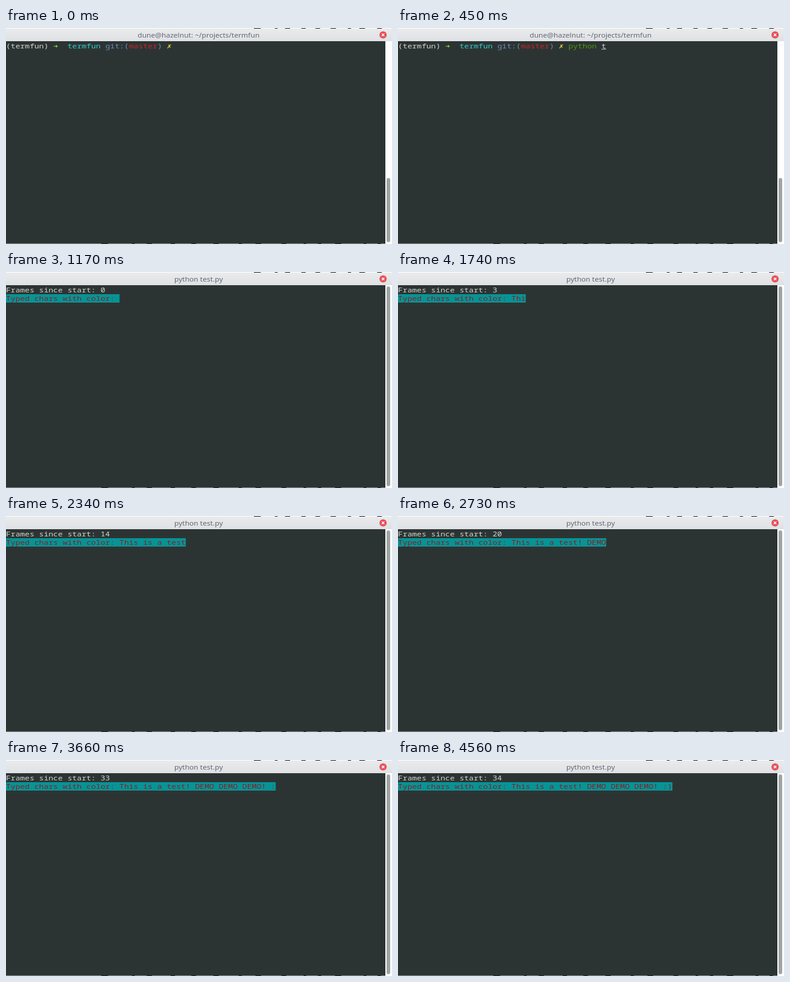
Recreate the animation shown at these times as an HTML page with a canvas. Size 640 px wide and 360 px high, loop 4.62 s.

```html
<!DOCTYPE html>
<html lang="en">
<head>
<meta charset="utf-8">
<title>Terminal typing</title>
<style>
  html, body { margin: 0; width: 100%; height: 100%; overflow: hidden; }
  canvas { display: block; }
</style>
</head>
<body>
<canvas id="stage" width="640" height="360"></canvas>
<script>
const ctx = document.getElementById('stage').getContext('2d');
const LOOP = 4620, COL = 7.845, ROW = 14, ASPECT = 0.87;
const MONO = '13.075px "Noto Sans Mono", "DejaVu Sans Mono", monospace';
const SANS = '12px "Noto Sans", sans-serif';
const LIGHT = '#d3d7cf', BLUE = '#688fba';
const LABEL = 'Typed chars with color: ';
const TITLE_TIME = 1110, LAUNCH_TIME = 1170, COMMAND_PACE = 53, MESSAGE_PACE = 39;

// Each burst of typing starts at its own time (ms)
const BURSTS = [[1640, 'This is a test'], [2370, '! '], [2610, 'DEMO DEMO DEMO'],
  [3270, '!'], [3540, ' :'], [3960, ')']];

function typed(text, start, pace, t) {
  return text.slice(0, Math.max(0, 1 + Math.floor((t - start) / pace)));
}

function rect(x, y, w, h, color) {
  ctx.fillStyle = color;
  ctx.fillRect(x, y, w, h);
}

// The whole screen is slightly flattened, so all lettering is too
function text(string, x, y, color, font, align) {
  ctx.save();
  ctx.translate(x, y);
  ctx.scale(1, ASPECT);
  ctx.font = font;
  ctx.textAlign = align;
  ctx.fillStyle = color;
  ctx.fillText(string, 0, 0);
  ctx.restore();
}

function write(string, col, row, color, weight = '') {
  text(string, col * COL, 33.7 + row * ROW, color, weight + ' ' + MONO, 'left');
}

// Bits of the window behind, peeking out along an edge
function specks(x, y, gap) {
  for (let i = 1; x < 640; i++) {
    const random = Math.abs(Math.sin(i * 12.9898) * 43758.5453) % 1;
    rect(x, y, 4 + random * 8, 1, '#222');
    x += gap * (0.6 + random * 0.8);
  }
}

function drawWindow(title, thumbTop) {
  rect(0, 0, 640, 360, '#fff');
  const bar = ctx.createLinearGradient(0, 1, 0, 22);
  bar.addColorStop(0, '#e9eaec');
  bar.addColorStop(1, '#dfe1e4');
  rect(0, 1, 640, 21, bar);
  rect(0, 22, 629, 337, '#2c3433');
  rect(0, 359, 629, 1, '#8a8f8e');
  specks(411, 0, 26);
  specks(158, 359, 38);

  ctx.fillStyle = '#a0a4a4';
  ctx.beginPath();
  ctx.roundRect(631, thumbTop, 6, 357 - thumbTop, 3);
  ctx.fill();

  text(title, 319.3, 16, '#626974', SANS, 'center');

  ctx.fillStyle = '#e9505a';
  ctx.beginPath();
  ctx.arc(625.2, 11.6, 6, 0, 7);
  ctx.fill();
  ctx.strokeStyle = '#fff';
  ctx.lineWidth = 1.4;
  ctx.beginPath();
  for (const d of [-2, 2]) {
    ctx.moveTo(625.2 - d, 9.6);
    ctx.lineTo(625.2 + d, 13.6);
  }
  ctx.stroke();
}

function drawPrompt(t) {
  write('(termfun)', 0, 0, LIGHT);
  write('➜', 10, 0, '#83d832', 'bold');
  write('termfun', 13, 0, '#30cfd0');
  write('git:(', 21, 0, BLUE);
  write('master', 26, 0, '#cf2424');
  write(')', 32, 0, BLUE);
  write('✗', 34, 0, '#f4e14c', 'bold');

  const command = typed('python test.py', 30, COMMAND_PACE, t);
  const file = command.slice(7);
  write(command.slice(0, 6), 36, 0, command.length < 6 ? '#e02a2a' : '#4e9a06');
  write(file, 43, 0, LIGHT);
  rect(43 * COL, 34.7, file.length * COL, 1, LIGHT);
}

function drawProgram(t) {
  const message = BURSTS.map(([start, part]) => typed(part, start, MESSAGE_PACE, t)).join('');
  const line = LABEL + message;
  write('Frames since start: ' + message.length, 0, 0, LIGHT);
  rect(0, 37, line.length * COL, ROW, '#069496');
  write(line, 0, 1, '#8f1c20');
}

function draw(now) {
  const t = now % LOOP;
  if (t < TITLE_TIME) drawWindow('dune@hazelnut: ~/projects/termfun', 250);
  else drawWindow('python test.py', t < LAUNCH_TIME ? 250 : 24);
  if (t < LAUNCH_TIME) drawPrompt(t);
  else drawProgram(t);
  requestAnimationFrame(draw);
}

requestAnimationFrame(draw);
</script>
</body>
</html>
```
